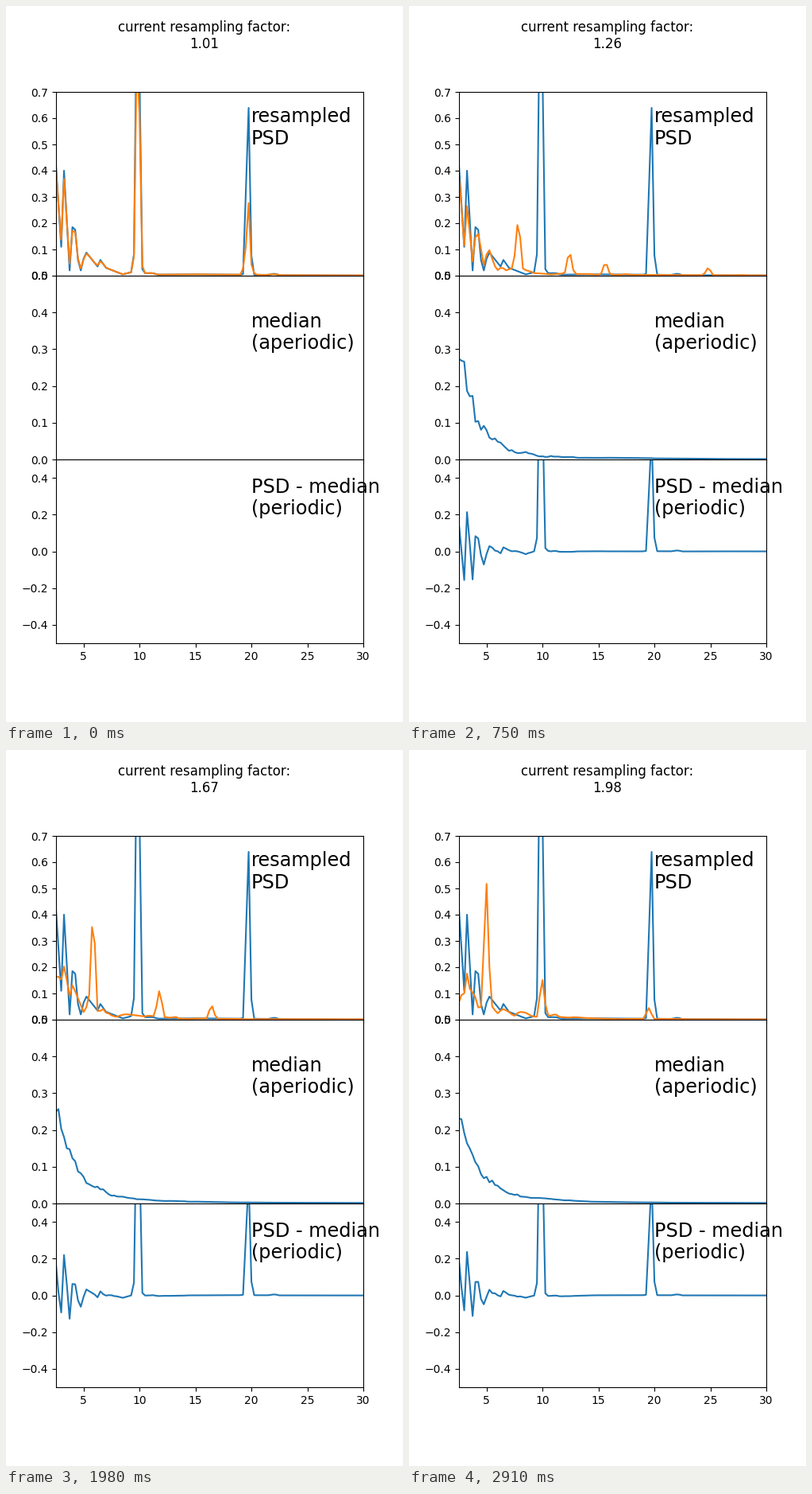
A matplotlib script that plays this animation: 500 px wide and 900 px high, repeating every 2940 ms.

```python
import numpy as np
import matplotlib.pyplot as plt
from matplotlib.animation import FuncAnimation

N_FRAMES = 98
STEP = 0.25
TONES = [(9.845, 1.25), (19.69, 0.685)]    # base rhythm and harmonic: Hz, power

freq = np.arange(2.5, 30 + STEP / 2, STEP)
factors = np.round(1.01 + 0.01 * np.arange(N_FRAMES), 2)

# Turning points of the background noise: Hz, power
NOISE = np.array([
    (1.2, .05), (1.5, .15), (1.65, .6), (1.8, .35), (1.97, .55), (2.25, .22),
    (2.5, .44), (3, .11), (3.25, .4), (3.75, .02), (4, .185), (4.25, .175),
    (4.5, .06), (4.75, .02), (5, .065), (5.25, .088), (6.25, .035),
    (6.5, .06), (7, .03), (8.5, .005), (9.25, .013), (10.25, .009),
    (11.2, .01), (11.6, .004), (15, .005), (21.5, .003), (22.1, .008),
    (22.5, .002), (30, .001), (60, .0003),
])


def background(f):
    return np.interp(f, *NOISE.T)


def peak(center):
    """Power of a pure tone seen through a Hann window."""
    d = (freq - center) / STEP
    return (np.sinc(d) + 0.5 * (np.sinc(d - 1) + np.sinc(d + 1))) ** 2


def spectrum(h=1):
    """Spectrum of the signal played h times faster."""
    tones = sum(power * peak(f * h) for f, power in TONES)
    return background(freq / h) / h + tones


psd = spectrum()
spectra = np.array([np.sqrt(spectrum(h) * spectrum(1 / h)) for h in factors])

fig, axes = plt.subplots(3, 1, sharex=True, figsize=(5, 9), dpi=100,
                         gridspec_kw=dict(hspace=0, left=0.125, right=0.9,
                                          bottom=0.11, top=0.88))
panels = [
    ("resampled\nPSD", 0.5, (0, 0.7), np.linspace(0, 0.7, 8)),
    ("median\n(aperiodic)", 0.3, (0, 0.5), np.linspace(0, 0.5, 6)),
    ("PSD - median\n(periodic)", 0.2, (-0.5, 0.5), np.linspace(-0.4, 0.4, 5)),
]
for ax, (label, y, ylim, ticks) in zip(axes, panels):
    ax.text(20, y, label, fontsize="xx-large")
    ax.set_yticks(ticks)
    ax.set_ylim(ylim)
axes[2].set_xticks(range(5, 31, 5))
axes[2].set_xlim(2.5, 30)

axes[0].plot(freq, psd, "C0")
line, = axes[0].plot([], [], "C1")
median_line, = axes[1].plot([], [], "C0")
periodic_line, = axes[2].plot([], [], "C0")
title = fig.suptitle("")


def update(i):
    title.set_text(f"current resampling factor:\n{factors[i]}")
    line.set_data(freq, spectra[i])
    # The median covers only the factors already passed
    if i:
        median = np.median(spectra[:i], axis=0)
        median_line.set_data(freq, median)
        periodic_line.set_data(freq, psd - median)
    else:
        median_line.set_data([], [])
        periodic_line.set_data([], [])
    return line, median_line, periodic_line, title


anim = FuncAnimation(fig, update, frames=N_FRAMES, interval=30,
                     init_func=lambda: update(0), repeat=True, repeat_delay=0)
plt.show()
```
